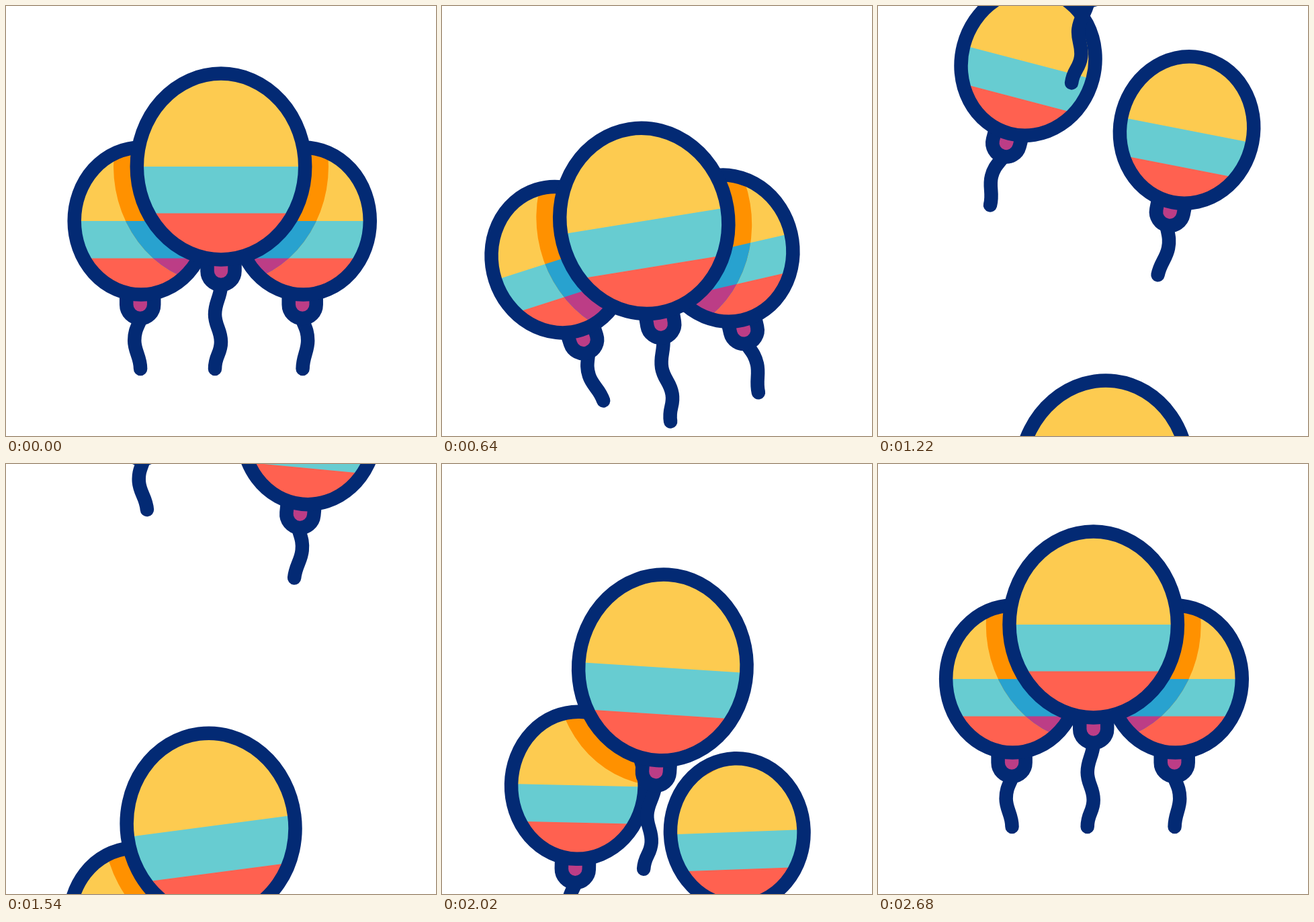
Write an HTML page with a canvas that moves like this. It is 640 px wide and 640 px high and loops after 3000 ms.

```html
<!DOCTYPE html>
<html lang="en">
<head>
<meta charset="utf-8">
<title>Balloons</title>
<style>
  html, body { margin: 0; width: 100%; height: 100%; overflow: hidden; background: #fff; }
  canvas { display: block; width: 100vmin; height: 100vmin; }
</style>
</head>
<body>
<canvas id="stage"></canvas>
<script>
const SIZE = 640, LOOP = 3000, LINE = 20.5;
const NAVY = '#032a74', KNOT = '#bc3d86';
const LIGHT = ['#fdcb50', '#67ccd1', '#ff6150'];
const DARK = ['#ff9100', '#28a2cf', '#bc3d86'];

// Times in ms, speeds in px per ms, swings in degrees.
const center = {
  x: 320, y: 239, rx: 125.2, ry: 138.4, band: 69.5, pivot: 120, knotX: 0, knotY: 155.5, shift: 0.7,
  dip: 84, turn: 755, up: 1.19, arrive: 2271, speed: 0.49,
  first: 510, beat: 510, shrink: 1, swings: [-13.6, 14.8, -7.5, 3.7, 0]
};
const side = { y: 320, rx: 99.3, ry: 109.6, band: 55.5, pivot: 89, knotX: -1.3, knotY: 124.5, up: 0.727 };
const left = {
  ...side, x: 201, bend: -8.5, shift: -0.6,
  dip: 57.5, turn: 773, arrive: 2516, speed: 0.422,
  first: 640, beat: 544, shrink: 0.85, swings: [-17.8, 15, -7, 1.3, -19, 0]
};
const right = {
  ...side, x: 442.5, bend: 8, shift: 0,
  dip: 49, turn: 925, arrive: 2647, speed: 0.45,
  first: 780, beat: 570, shrink: 0.88, swings: [-14, 14.5, -14, 23, 0]
};

const canvas = document.getElementById('stage');
const ctx = canvas.getContext('2d');
let scale = 1;

const ease = p => (1 - Math.cos(Math.PI * Math.min(1, p))) / 2;

// Time travelled at full speed when the first "soft" ms are used to speed up.
const ramp = (t, soft) => t <= 0 ? 0 : t < soft ? t * t / (2 * soft) : t - soft / 2;

const rise = (b, t) => b.dip * ease(t / b.turn) - b.up * ramp(t - b.turn, 80);
const enter = (b, t) => b.speed * ramp(b.arrive - t, 240);

// Swings from side to side, each beat shorter than the one before.
function sway(b, t) {
  let from = 0, span = b.first, next = b.beat;
  for (const to of b.swings) {
    if (t < span) return from + (to - from) * ease(t / span);
    t -= span;
    span = next;
    next *= b.shrink;
    from = to;
  }
  return from;
}

// Moves to the balloon's own frame; it swings around a point below its middle.
function place(b, path, t) {
  const shift = path === enter ? b.shift : 0;
  ctx.translate(b.x + shift, b.y + b.pivot + path(b, t));
  ctx.rotate(sway(b, t) * Math.PI / 180);
  ctx.translate(0, -b.pivot);
}

function ellipse(rx, ry) {
  ctx.beginPath();
  ctx.ellipse(0, 0, rx, ry, 0, 0, 2 * Math.PI);
}

function bands(b, colors) {
  [-160, 0, b.band].forEach((top, i) => {
    ctx.fillStyle = colors[i];
    ctx.fillRect(-150, top, 300, 160 - top);
  });
}

function string(b) {
  ctx.beginPath();
  if (b.bend) {
    const x = b.knotX, m = x + b.bend;
    ctx.moveTo(x, 148);
    ctx.bezierCurveTo(x + b.bend * 0.5, 158, m, 164, m, 178);
    ctx.bezierCurveTo(m, 194, x + 0.4, 202, x + 0.4, 220);
  } else {
    ctx.moveTo(0, 179);
    ctx.bezierCurveTo(-2, 197, -9, 203, -9, 220);
    ctx.bezierCurveTo(-9, 237, 0, 243, 0, 261);
    ctx.bezierCurveTo(0, 279, -9, 281, -9, 301);
  }
  ctx.stroke();
}

function knot(b) {
  const r = 20.5, top = b.ry - 6;
  ctx.beginPath();
  ctx.moveTo(b.knotX + r, top);
  ctx.arc(b.knotX, b.knotY, r, 0, Math.PI);
  ctx.lineTo(b.knotX - r, top);
  ctx.fillStyle = KNOT;
  ctx.fill();
  ctx.stroke();
}

// Darker bands where the middle balloon throws its shade.
function shade(b, path, t) {
  const own = ctx.getTransform();
  ctx.setTransform(scale, 0, 0, scale, 0, 0);
  place(center, path, t);
  ellipse(160, 176);
  ctx.setTransform(own);
  ctx.clip();
  bands(b, DARK);
}

function balloon(b, path, t) {
  ctx.save();
  place(b, path, t);
  string(b);
  knot(b);

  ctx.save();
  ellipse(b.rx, b.ry);
  ctx.clip();
  bands(b, LIGHT);
  if (b !== center) shade(b, path, t);
  ctx.restore();

  ellipse(b.rx, b.ry);
  ctx.stroke();
  ctx.restore();
}

function draw(t) {
  const px = Math.round(canvas.clientWidth * devicePixelRatio) || SIZE;
  if (canvas.width !== px) canvas.width = canvas.height = px;
  scale = px / SIZE;
  ctx.setTransform(scale, 0, 0, scale, 0, 0);
  ctx.fillStyle = '#fff';
  ctx.fillRect(0, 0, SIZE, SIZE);
  ctx.strokeStyle = NAVY;
  ctx.lineWidth = LINE;
  ctx.lineCap = 'round';
  for (const path of [rise, enter]) {
    for (const b of [right, left, center]) balloon(b, path, t);
  }
}

const start = performance.now();
function tick() {
  draw((performance.now() - start) % LOOP);
  requestAnimationFrame(tick);
}
tick();
</script>
</body>
</html>
```
